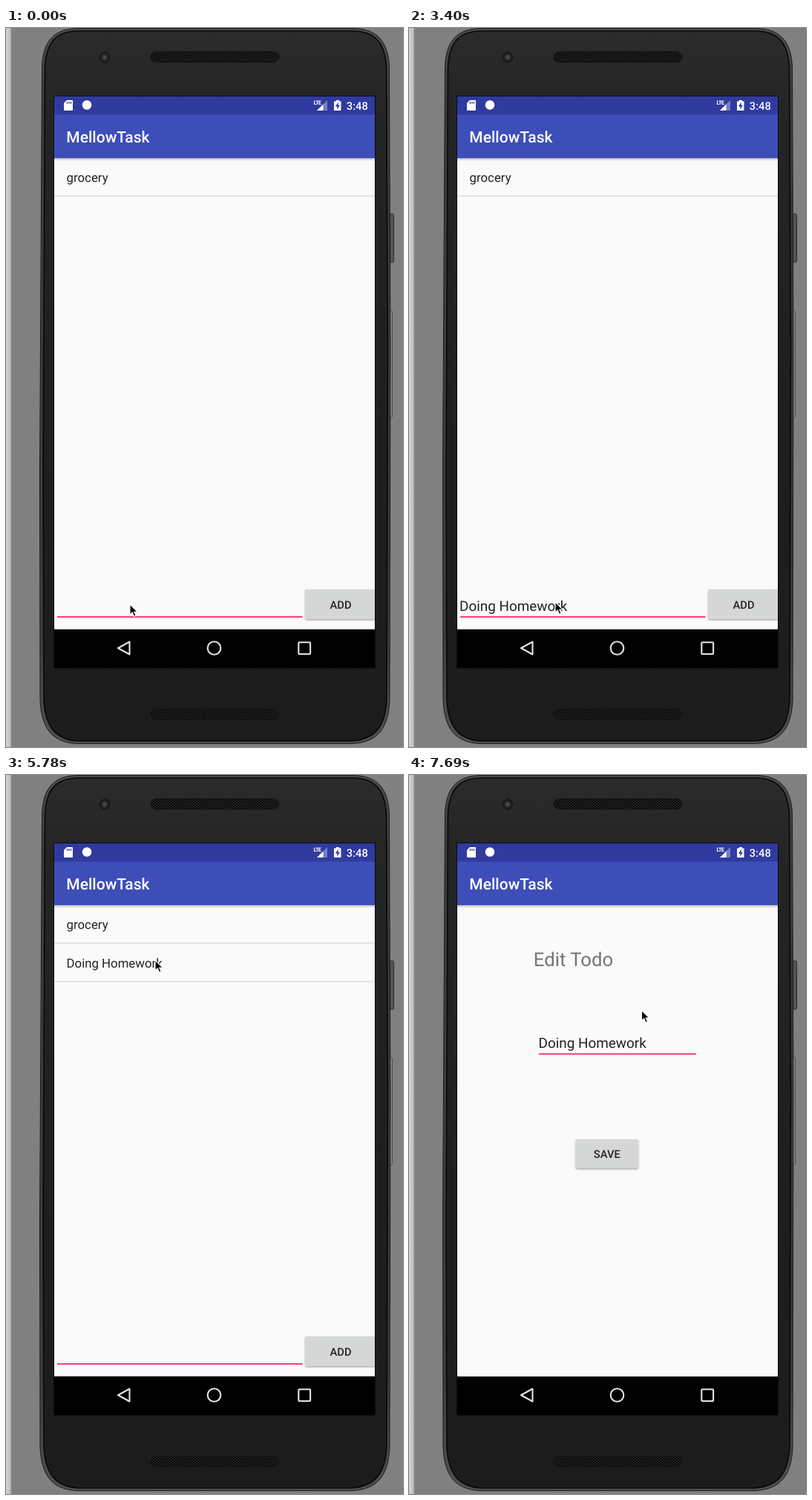
These frames come from a looping animation (535x967 px, 8 s). An HTML page:

```html
<!DOCTYPE html>
<html lang="en">
<head>
<meta charset="utf-8">
<title>Todo list demo</title>
<style>
  html, body { margin: 0; width: 100%; height: 100%; overflow: hidden; background: #808080; }
  svg { display: block; width: 100%; height: 100%; }
  text { font-family: Roboto, "Open Sans", sans-serif; fill: #232323; white-space: pre; text-rendering: geometricPrecision; }
  .title { font-size: 21px; font-weight: 500; fill: #fff; }
  .item { font-size: 16.8px; }
  .field { font-size: 18.9px; }
  .label { font-size: 14.7px; font-weight: 500; text-anchor: middle; }
  .heading { font-size: 25.7px; fill: #757575; }
  .clock { font-size: 14.7px; font-weight: 500; fill: #fff; }
  .lte { font-size: 7.5px; font-weight: 700; letter-spacing: -.8px; fill: #fff; }
  .accent { fill: #f5437f; }
  .rule { fill: #dfdfdf; }
  .button { fill: #d5d7d6; }
  .button.pressed { fill: #cbcdcc; }
  .nav { fill: none; stroke: #e4e4e4; stroke-width: 2.1; stroke-linejoin: round; }
</style>
</head>
<body>
<svg viewBox="0 0 535 967" preserveAspectRatio="none">
  <defs>
    <linearGradient id="edge">
      <stop offset="0" stop-color="#d4d4d4"/>
      <stop offset=".7" stop-color="#c2c2c2"/>
      <stop offset="1" stop-color="#8e8e8e"/>
    </linearGradient>
    <linearGradient id="rim" x2="0" y2="1">
      <stop offset="0" stop-color="#4c4c4c"/>
      <stop offset=".1" stop-color="#3c3c3c"/>
      <stop offset=".85" stop-color="#3c3c3c"/>
      <stop offset="1" stop-color="#505050"/>
    </linearGradient>
    <linearGradient id="body" x2="0" y2="1">
      <stop offset="0" stop-color="#2b2b2c"/>
      <stop offset=".1" stop-color="#252526"/>
      <stop offset=".5" stop-color="#1f1f1f"/>
      <stop offset="1" stop-color="#1c1c1c"/>
    </linearGradient>
    <linearGradient id="shade" x2="0" y2="1">
      <stop offset="0" stop-opacity=".25"/>
      <stop offset="1" stop-opacity="0"/>
    </linearGradient>
    <pattern id="mesh" width="4" height="4" patternUnits="userSpaceOnUse">
      <rect width="4" height="4" fill="#232323"/>
      <circle cx="1" cy="1" r="1.1" fill="#050505"/>
      <circle cx="3" cy="3" r="1.1" fill="#050505"/>
    </pattern>
    <filter id="drop" x="-10%" y="-10%" width="120%" height="130%">
      <feDropShadow dx="0" dy="1.3" stdDeviation="1" flood-opacity=".35"/>
    </filter>
    <clipPath id="screen"><rect x="65" y="92" width="432" height="768.5"/></clipPath>
    <g id="app">
      <rect x="65" y="117" width="433" height="691.7" fill="#fafafa"/>
      <rect x="65" y="92" width="433" height="25" fill="#303a9f"/>
      <rect x="65" y="116.5" width="433" height="58.5" fill="#3d4eb8"/>
      <rect x="65" y="175" width="433" height="4" fill="url(#shade)"/>
      <text class="title" x="81.3" y="154">MellowTask</text>
    </g>
    <g id="speaker">
      <rect x="195" y="32" width="173" height="14" rx="7" fill="url(#mesh)" stroke="#111"/>
    </g>
  </defs>

  <rect width="535" height="967" fill="#808080"/>
  <rect width="7.5" height="967" fill="url(#edge)"/>

  <!-- phone -->
  <rect x="516" y="250" width="6.5" height="65" rx="1.5" fill="#555" stroke="#2c2c2c"/>
  <rect x="516" y="380" width="4.5" height="144" rx="1.5" fill="#8c8c8c" stroke="#4a4a4a"/>
  <path d="M98 .5H467C500 .5 515 18 516.500 52L518 430 517 905C515 942 501 961 466 962.500H96C62 961 48 942 46 905L45.500 600 48.500 52C50 18 64 .5 98 .5Z"
        fill="url(#rim)" stroke="#1a1a1a"/>
  <path d="M98 4H467C497 4 511 20 512.500 53L514.500 430 513 904C511 939 498 957 465 959H97C66 957 53 939 51 904L50 600 52.500 53C54 20 67 4 98 4Z"
        fill="url(#body)" stroke="#080808" stroke-width="1.6"/>
  <use href="#speaker"/>
  <use href="#speaker" y="884"/>
  <circle cx="133" cy="39.500" r="7.500" fill="#1a1a1a"/>
  <circle cx="133" cy="39.500" r="4.500" fill="#303030"/>
  <circle cx="133" cy="39.500" r="2.200" fill="#4a4a4c"/>

  <rect x="64" y="91" width="434" height="770.500" fill="#0c0c0c"/>
  <g clip-path="url(#screen)">
    <rect x="65" y="92" width="433" height="769"/>
    <g id="list">
      <use href="#app"/>
      <text class="item" x="81.600" y="207">grocery</text>
      <rect class="rule" x="65" y="225.300" width="433" height="1.600"/>
      <g id="added">
        <text class="item" x="81.600" y="258.500">Doing Homework</text>
        <rect class="rule" x="65" y="277" width="433" height="1.600"/>
      </g>
      <text class="field" id="typed" x="68" y="783.500"></text>
      <rect class="accent" x="69" y="791" width="330.500" height="2.100"/>
      <rect class="accent" id="caret" y="765" width="2" height="24"/>
      <rect class="button" id="add" x="403" y="755" width="97" height="40" rx="2" filter="url(#drop)"/>
      <text class="label" x="451" y="780.500">ADD</text>
    </g>

    <g id="edit">
      <use href="#app"/>
      <text class="heading" x="167.800" y="257">Edit Todo</text>
      <text class="field" x="174.500" y="366.500">Doing Homework</text>
      <rect class="accent" x="175" y="374.200" width="212" height="2.100"/>
      <rect class="accent" id="editCaret" x="175" y="346" width="2" height="25"/>
      <rect class="button" x="224.500" y="490" width="84.500" height="39" rx="2" filter="url(#drop)"/>
      <text class="label" x="266.800" y="514.800">SAVE</text>
    </g>

    <!-- status icons -->
    <path fill="#fff" d="M82 97H89Q90 97 90 98V110Q90 111 89 111H79Q78 111 78 110V101Z"/>
    <path stroke="#303a9f" stroke-width="1.200" d="M82.500 99V102M85 99V102M87.500 99V102"/>
    <circle cx="109" cy="103.500" r="6.300" fill="#fff"/>
    <text class="lte" x="414.500" y="102.500">LTE</text>
    <path fill="#fff" opacity=".35" d="M433 97V111H419Z"/>
    <path fill="#fff" d="M427.500 102.500V111H419Z"/>
    <path fill="#fff" d="M445 97H449V98.400H451.500V111H442V98.400H445Z"/>
    <path fill="#303a9f" d="M447.700 99.800 443.800 105.500H446.300V109.600L449.900 103.900H447.700Z"/>
    <text class="clock" x="458.800" y="109.800">3:48</text>

    <path class="nav" d="M151 834 166.500 825.500V842.500Z"/>
    <circle class="nav" cx="280.500" cy="834" r="8.800"/>
    <rect class="nav" x="394.300" y="826.200" width="15.800" height="15.800" rx="1"/>
  </g>

  <path id="pointer" d="M0 0V14L3.200 11 5.600 16.400 8 15.300 5.700 10.200H10Z" stroke="#fff" stroke-width="1.100"/>
</svg>

<script>
  const LOOP = 8000;
  const $ = id => document.getElementById(id);

  // Each track holds [start, ...values]; values stay until the next entry.
  const typing = [
    [0, ''], [590, 'D'], [890, 'Do'], [1030, 'Doi'], [1180, 'Doin'], [1320, 'Doing '],
    [2070, 'Doing H'], [2370, 'Doing Ho'], [2520, 'Doing Hom'], [2670, 'Doing Homew'],
    [2820, 'Doing Homewo'], [2960, 'Doing Homework'], [4290, '']
  ];
  const blink = [
    [0, 0], [290, 1], [1920, 0], [2070, 1], [3400, 0], [3840, 1],
    [4730, 0], [5180, 1], [5630, 0], [6350, 1], [6790, 0], [7240, 1], [7690, 0]
  ];
  const moves = [
    [0, 167, 775], [3400, 197, 772], [3550, 245, 774], [3700, 345, 771], [3840, 425, 765],
    [3990, 444, 762], [4590, 345, 560], [4730, 205, 308], [5030, 203, 240],
    [5180, 202, 221], [5480, 201, 236], [5630, 201, 245], [5780, 201, 249],
    [6640, 235, 272], [6790, 290, 304], [6940, 313.5, 316.5]
  ];
  const slide = [[0, 0, 0], [6200, 14, .83], [6350, 1, 1], [6500, 0, 1]];

  const at = (track, t) => track.findLast(step => step[0] <= t).slice(1);
  const show = (id, on) => $(id).setAttribute('visibility', on ? 'visible' : 'hidden');

  function draw(t) {
    const [text] = at(typing, t), [lit] = at(blink, t);
    const [x, y] = at(moves, t), [dy, alpha] = at(slide, t);
    const editing = alpha > 0;

    if ($('typed').textContent !== text) $('typed').textContent = text;
    $('caret').setAttribute('x', 68.5 + (text ? $('typed').getComputedTextLength() : 0));
    show('caret', lit && !editing);
    show('added', t >= 4290);
    $('add').classList.toggle('pressed', t >= 4290 && t < 4590);

    $('edit').setAttribute('transform', `translate(0 ${dy})`);
    $('edit').setAttribute('opacity', alpha);
    show('editCaret', lit && editing);
    $('pointer').setAttribute('transform', `translate(${x} ${y})`);
  }

  const start = performance.now();
  function tick() {
    draw((performance.now() - start) % LOOP);
    requestAnimationFrame(tick);
  }
  tick();
</script>
</body>
</html>
```
